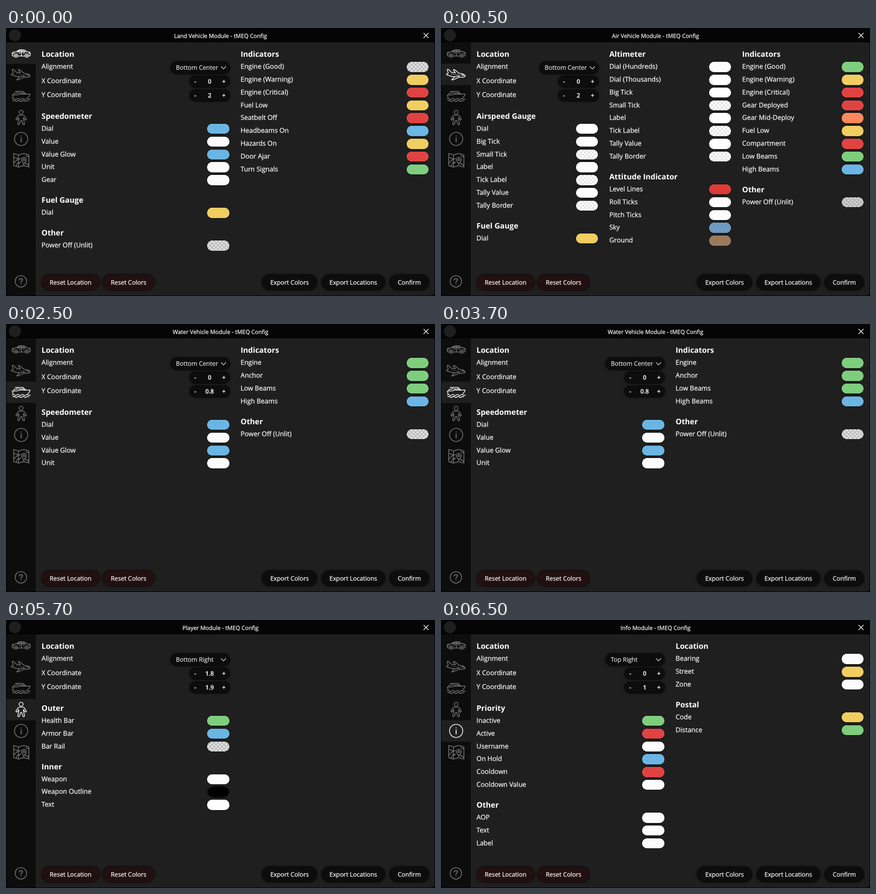
These frames come from a looping animation (864 by 540 pixels, 8 s). An HTML page:

```html
<!DOCTYPE html>
<html lang="en">
<head>
<meta charset="utf-8">
<title>HUD settings</title>
<style>
html, body { margin: 0; width: 100%; height: 100%; overflow: hidden; background: #000; }
svg { display: block; width: 864px; height: 540px; font-family: "Open Sans", "Noto Sans", sans-serif; }
text { color: #fff; fill: currentColor; stroke: currentColor; stroke-width: .25px; font-size: 13.35px; text-rendering: geometricPrecision; white-space: pre; }
.title { font-size: 11.45px; }
.head { font-size: 15.3px; font-weight: 700; stroke: none; }
.ctl { font-size: 12.35px; }
.soft { color: #dcdcdc; }
.num { font-size: 12px; font-weight: 600; }
.mid { text-anchor: middle; }
.pill { fill: #0d0d0d; stroke: #080808; filter: drop-shadow(0 0 2px #0009); }
.danger { fill: #221011; stroke: #150a0a; }
.icon { fill: none; stroke: currentColor; stroke-width: 1.6; stroke-linecap: round; stroke-linejoin: round; }
.off { color: #6f6f6f; }
.on { color: #ececec; }
.screen { visibility: hidden; animation: 8s step-end infinite; }
#s0 { animation-name: land; }
#s1 { animation-name: air; }
#s2 { animation-name: water; }
#s3 { animation-name: player; }
#s4 { animation-name: info; }
@keyframes land { 0% { visibility: visible } 6.25%, 100% { visibility: hidden } }
@keyframes air { 0% { visibility: hidden } 6.25% { visibility: visible } 31.25%, 100% { visibility: hidden } }
@keyframes water { 0% { visibility: hidden } 31.25% { visibility: visible } 56.25%, 100% { visibility: hidden } }
@keyframes player { 0% { visibility: hidden } 56.25% { visibility: visible } 81.25%, 100% { visibility: hidden } }
@keyframes info { 0% { visibility: hidden } 81.25%, 100% { visibility: visible } }
</style>
</head>
<body>
<svg viewBox="0 0 864 540">
  <defs>
    <pattern id="check" width="8" height="8" patternUnits="userSpaceOnUse">
      <path fill="#fff" d="M0 0h8v8h-8z"/>
      <path fill="#aaa" d="M4 0h4v4h-4zM0 4h4v4h-4z"/>
    </pattern>
    <clipPath id="win"><rect x="1" y="1" width="862" height="538" rx="5"/></clipPath>

    <g id="i0" class="icon">
      <path d="M16.300 56.500h-2.300q-1.500 0-1.500-2v-3q0-2 2.500-2.600l6-1.200 4.500-3q1.500-.9 4-.9h4q2.500 0 4.500 1.200l4 2.700 5 .9q1.800.5 1.800 2.900v2.800q0 2.200-2 2.200h-.8M24.200 56.500h13.600"/>
      <path d="M22.500 48.200l4-2.300h8l4.500 2.300zM31 46v10M13 51.500h3M46 50.800h2.500M26.500 50.700h2M35 50.700h2"/>
      <circle cx="20.200" cy="55.500" r="3.500"/><circle cx="20.200" cy="55.500" r="1"/>
      <circle cx="41.800" cy="55.500" r="3.500"/><circle cx="41.800" cy="55.500" r="1"/>
    </g>
    <g id="i1" class="icon">
      <path d="M12.500 83.500h3.200l5 5.800 8 1-4-6.300h3l8.300 7.200 5 .6q6 1.200 7.800 4.900-1.300 2.500-6 2.500h-6.800l-11 5.200h-3.500l6-6q-8-.5-13-3.400h-2.500l-1-1.800 3.500-2.200z"/>
      <path d="M43 92.800l-.5 2.500h4.800M21.500 92.700h.2M25 93.300h.2M28.500 93.800h.2M32 94.300h.2M35.500 94.700h.2M39 95h.2M28 98.300l8-1.800 1 2.200"/>
    </g>
    <g id="i2" class="icon">
      <path d="M14.300 140.500l-1.600-5.500 10-.3 4-1.400h22q-1.200 4-4.500 7.200"/>
      <path d="M15.500 134.500l1-3h5l2.500-3.700h9.500q3.500 1.800 6.500 5.500M18.500 127.800h16M25.500 131h9.500l2.500 2.300"/>
      <path d="M12.500 143q2.300-2 4.600 0t4.600 0 4.600 0 4.600 0 4.600 0 4.600 0 4.600 0 4 0M14 146.800q2.300-2 4.600 0t4.600 0 4.600 0 4.600 0 4.600 0 4.600 0 4 0"/>
    </g>
    <g id="i3" class="icon">
      <circle cx="30.500" cy="169.700" r="4"/>
      <path d="M27.300 175.500h6.400q1.500 0 2.700 1.300l4.300 6.200q.7 1.500-.5 2.200-1.200.6-2.200-.6l-3-4 .8 5 1.300 7.400q0 1.800-1.600 1.800-1.400 0-1.900-1.700l-2.200-7.100h-1.800l-2.200 7.100q-.5 1.700-1.900 1.700-1.600 0-1.600-1.800l1.300-7.400.8-5-3 4q-1 1.200-2.200.6-1.200-.7-.5-2.200l4.300-6.200q1.200-1.300 2.700-1.300z"/>
    </g>
    <g id="i4" class="icon">
      <circle cx="30.500" cy="223.500" r="13.300"/>
      <path stroke-width="2" d="M30.500 222v7.500M30.500 217.500v.2"/>
    </g>
    <g id="i5" class="icon">
      <path d="M15.500 252.800l9.700 3 10.500-3 10.500 3v24.500l-10.500-3-10.500 3-9.700-3zM25.200 255.800v24.500M35.700 274v3.300M15.500 261q5 0 9.700 4M15.500 273q5-8 13.500-10M25.200 273l4-3M20 279l4-8M40 257l6 3M39 272l7 5"/>
      <path d="M36 274.300l-4-6.300q-2-3.700.3-6 3.700-3 7.400 0 2.300 2.300.3 6z"/>
      <circle cx="36" cy="265.200" r="1.800"/>
    </g>
  </defs>

  <g clip-path="url(#win)">
    <path fill="#1f1f1f" d="M0 0h864v540h-864z"/>
    <path fill="#0d0d0d" d="M0 29h60v511h-60z"/>
    <path fill="#050505" d="M0 0h864v29h-864z"/>
  </g>
  <circle cx="18" cy="14.500" r="12" fill="#1f1f1f"/>
  <path d="M841 10l10 10m0-10l-10 10" stroke="#fff" stroke-width="1.300"/>
  <g class="off">
    <g class="icon"><circle cx="30" cy="510.500" r="11.500"/>
      <path stroke-width="1.800" d="M26.700 507.800q.2-3 3.300-3t3.300 2.800q0 1.500-1.800 2.600t-1.500 2.600M30 516v.2"/></g>
  </g>
  <g id="ui"></g>
</svg>
<script>
const paint = {
  b: ['#62b4e7', .92], y: ['#f4ce56', .92], r: ['#e23737', .92], g: ['#77ce77', .92],
  w: ['#fff', .93], W: ['#fff', 1], t: ['#fff', .7], u: ['#c8c8c8', .55], v: ['#b2b2b2', .6],
  R: ['#dd3a38', 1], o: ['#ff875a', .97], s: ['#6894c2', .92], e: ['#967858', .97], k: ['#000', 1]
};
const two = [[71.5, 449.6], [472.5, 851.4]];
const three = [[71.5, 316.3], [339, 583.9], [606.5, 851.4]];
const rowStep = 25.8, sectionGap = 40.3;

// Each column lists sections as "Heading|Label=paint|..."
const screens = [
  { name: 'Land Vehicle', grid: two, loc: ['Bottom Center', 0, 2], cols: [
    ['Speedometer|Dial=b|Value=w|Value Glow=b|Unit=w|Gear=w', 'Fuel Gauge|Dial=y', 'Other|Power Off (Unlit)=u'],
    ['Indicators|Engine (Good)=u|Engine (Warning)=y|Engine (Critical)=r|Fuel Low=y|Seatbelt Off=r|Headbeams On=b|Hazards On=y|Door Ajar=r|Turn Signals=g']] },
  { name: 'Air Vehicle', grid: three, loc: ['Bottom Center', 0, 2], cols: [
    ['Airspeed Gauge|Dial=W|Big Tick=W|Small Tick=t|Label=W|Tick Label=t|Tally Value=W|Tally Border=t', 'Fuel Gauge|Dial=y'],
    ['Altimeter|Dial (Hundreds)=W|Dial (Thousands)=W|Big Tick=W|Small Tick=t|Label=W|Tick Label=t|Tally Value=W|Tally Border=t',
      'Attitude Indicator|Level Lines=R|Roll Ticks=w|Pitch Ticks=w|Sky=s|Ground=e'],
    ['Indicators|Engine (Good)=g|Engine (Warning)=y|Engine (Critical)=r|Gear Deployed=r|Gear Mid-Deploy=o|Fuel Low=y|Compartment=r|Low Beams=g|High Beams=b',
      'Other|Power Off (Unlit)=v']] },
  { name: 'Water Vehicle', grid: two, loc: ['Bottom Center', 0, 0.8], cols: [
    ['Speedometer|Dial=b|Value=w|Value Glow=b|Unit=w'],
    ['Indicators|Engine=g|Anchor=g|Low Beams=g|High Beams=b', 'Other|Power Off (Unlit)=u']] },
  { name: 'Player', grid: two, loc: ['Bottom Right', 1.8, 1.9], cols: [
    ['Outer|Health Bar=g|Armor Bar=b|Bar Rail=u', 'Inner|Weapon=W|Weapon Outline=k|Text=W']] },
  { name: 'Info', grid: two, loc: ['Top Right', 0, 1], cols: [
    ['Priority|Inactive=g|Active=r|Username=w|On Hold=b|Cooldown=r|Cooldown Value=w', 'Other|AOP=w|Text=w|Label=w'],
    ['Location|Bearing=w|Street=y|Zone=w', 'Postal|Code=y|Distance=g']] }
];

const text = (x, y, s, cls = '') => `<text x="${x}" y="${Math.round(y)}" class="${cls}">${s}</text>`;
const pill = (x, y, w, h, cls = '') =>
  `<rect x="${x}" y="${y}" width="${w}" height="${h}" rx="${h / 2}" class="pill ${cls}"/>`;

// Edges snap to whole pixels
function swatch(right, cy, key) {
  const [color, alpha] = paint[key];
  const x = Math.round(right - 44.4), y = Math.round(cy - 10.2);
  const w = Math.round(right) - x, h = Math.round(cy + 10.3) - y;
  const box = `width="${w}" height="${h}" rx="${h / 2}"`;
  return `<g transform="translate(${x} ${y})">
    <rect x="-.5" y="-.5" width="${w + 1}" height="${h + 1}" rx="${h / 2 + .5}" fill="none" stroke="#080808"/>
    <rect ${box} fill="url(#check)"/><rect ${box} fill="${color}" fill-opacity="${alpha}"/></g>`;
}

function column(sections, [left, right], top) {
  let y = top, out = '';
  for (const section of sections) {
    const [head, ...rows] = section.split('|');
    out += text(left, y - 20.2, head, 'head');
    for (const row of rows) {
      const [label, key] = row.split('=');
      out += text(left, y + 3.8, label) + swatch(right, y, key);
      y += rowStep;
    }
    y += sectionGap;
  }
  return out;
}

function stepper(right, cy, value) {
  return pill(right - 80, cy - 11.5, 81, 23) + text(right - 68.5, cy + 4, '-', 'num mid') +
    text(right - 39.5, cy + 4, value, 'num mid') + text(right - 11, cy + 4, '+', 'num mid');
}

function place([left, right], [align, x, y]) {
  return text(left, 58, 'Location', 'head') + text(left, 82, 'Alignment') +
    text(left, 111, 'X Coordinate') + text(left, 139, 'Y Coordinate') +
    pill(right - 118, 67.5, 119, 25) + text(right - 107.5, 84, align, 'ctl soft') +
    `<path d="M${right - 16.5} 77.500l5 5 5-5" fill="none" stroke="#ddd" stroke-width="1.200"/>` +
    stepper(right, 108, x) + stepper(right, 136, y);
}

const button = (x, w, label, cls) => pill(x, 497, w, 31, cls) + text(x + w / 2, 517, label, 'ctl mid');
const icon = (i, cls) => `<use href="#i${i}" class="${cls}"/>`;

function screen({ name, grid, loc, cols }, i) {
  const y = Math.round(29 + i * 43.3);
  const body = cols.map((c, n) => column(c, grid[n], n ? 78.4 : 203.1)).join('');
  return `<g class="screen" id="s${i}">
    <path fill="#1f1f1f" d="M1 ${y}h59v43h-59z"/>${icon(i, 'on')}
    ${text(432, 20, name + ' Module - tMEQ Config', 'title mid')}${place(grid[0], loc)}${body}</g>`;
}

document.getElementById('ui').innerHTML =
  [0, 1, 2, 3, 4, 5].map(i => icon(i, 'off')).join('') +
  button(71.5, 117, 'Reset Location', 'danger') + button(194.5, 104.5, 'Reset Colors', 'danger') +
  button(515.5, 111, 'Export Colors') + button(635.5, 128, 'Export Locations') +
  button(772.5, 79.5, 'Confirm') + screens.map(screen).join('');
</script>
</body>
</html>
```
